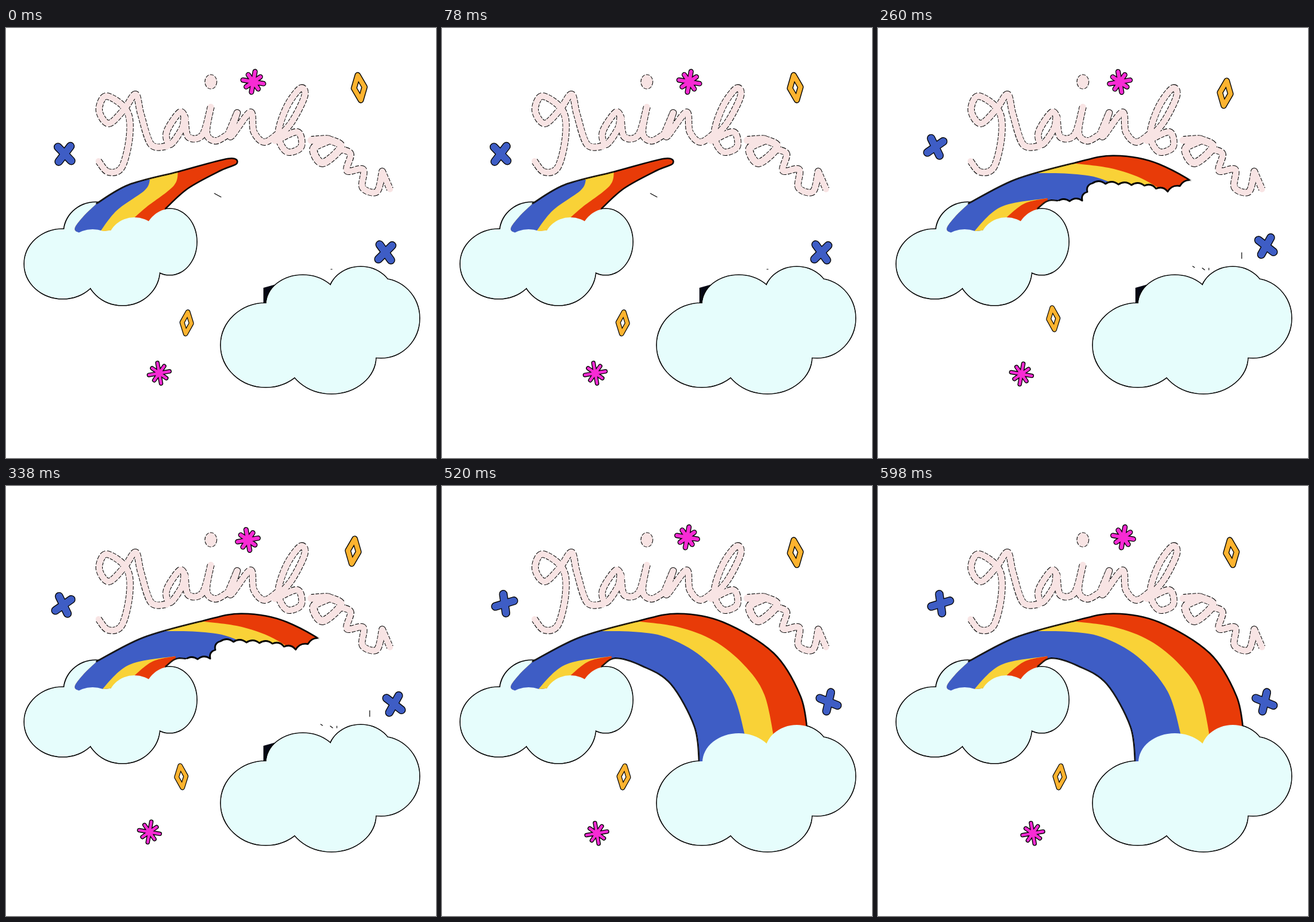
Recreate the animation shown at these times as an HTML page with a canvas. Size 720 by 720 pixels, loop 650 ms.

```html
<!DOCTYPE html>
<html lang="en">
<head>
<meta charset="utf-8">
<title>Rainbow</title>
<style>
html, body { margin: 0; height: 100%; overflow: hidden; background: #fff; }
canvas { display: block; }
</style>
</head>
<body>
<canvas id="stage" width="720" height="720"></canvas>
<script>
const ctx = document.getElementById('stage').getContext('2d');
const STEP = 130, POSES = 5, DEG = Math.PI / 180;
const INK = '#050505', CLOUD = '#e6fdfc', BLUE = '#3e5dc5', YELLOW = '#f9d237',
      RED = '#e83b08', PINK = '#f72bd4', GOLD = '#fdb32f', LETTER = '#f8e4e4';

const points = text => text.trim().split(/[\s/]+/).map(p => p.split(',').map(Number));

// Smooth line through "x,y" points; a slash makes a sharp corner.
function curve(text) {
  const path = new Path2D();
  let last = null;
  for (const part of text.split('/')) {
    const pts = points(part);
    if (last) pts.unshift(last); else path.moveTo(...pts[0]);
    for (let i = 0; i < pts.length - 1; i++) {
      const b = pts[i], c = pts[i + 1], a = pts[i - 1] || b, d = pts[i + 2] || c;
      path.bezierCurveTo(b[0] + (c[0] - a[0]) / 6, b[1] + (c[1] - a[1]) / 6,
        c[0] - (d[0] - b[0]) / 6, c[1] - (d[1] - b[1]) / 6, ...c);
    }
    last = pts[pts.length - 1];
  }
  return path;
}

// Union of ellipses [x, y, rx, ry].
function lobes(...list) {
  const path = new Path2D();
  for (const [x, y, rx, ry] of list) {
    path.moveTo(x + rx, y);
    path.ellipse(x, y, rx, ry, 0, 0, 2 * Math.PI);
  }
  return path;
}

// Everything below and left of a colour boundary.
function below(text) {
  const pts = points(text);
  return curve(`${text}/${pts[pts.length - 1][0]},480/90,480/90,${pts[0][1]}`);
}

// Torn front: scallops of about 20 px between key points.
function tear(text) {
  const pts = points(text), edge = new Path2D();
  edge.moveTo(...pts[0]);
  for (let i = 1; i < pts.length; i++) {
    const [x, y] = pts[i - 1], dx = pts[i][0] - x, dy = pts[i][1] - y;
    const size = Math.hypot(dx, dy), n = Math.max(1, Math.round(size / 20));
    for (let k = 1; k <= n; k++) {
      const mid = (k - .5) / n;
      edge.quadraticCurveTo(x + dx * mid + 8 * dy / size, y + dy * mid - 8 * dx / size,
        x + dx * k / n, y + dy * k / n);
    }
  }
  const area = new Path2D(edge);
  area.lineTo(pts[pts.length - 1][0], 150);
  area.lineTo(90, 150);
  area.lineTo(90, 400);
  area.lineTo(pts[0][0], 400);
  return { edge, area };
}

function line(path, width, colour) {
  ctx.lineWidth = width;
  ctx.strokeStyle = colour;
  ctx.stroke(path);
}

function fill(path, colour) {
  ctx.fillStyle = colour;
  ctx.fill(path);
}

function clipped(paths, draw) {
  ctx.save();
  paths.forEach(p => p && ctx.clip(p));
  draw();
  ctx.restore();
}

const word = [
  '155,223 171,241 194,233 207,180 202,138 168,114 156,138 172,160 198,136 217,111 226,145 243,195 270,198',
  '301,152 291,141 269,174 275,195 295,168 299,148 305,182 329,179 343,132',
  '343,132 336,176 351,189 372,178 / 387,142 / 376,182 409,141 415,174 433,191 458,175',
  '450,189 478,158 500,114 493,101 470,132 456,178 470,207 494,199 488,174 452,189',
  '560,203 577,211 571,239 598,237 597,267 621,274 630,240 / 643,270'
].map(curve);
const letterO = curve('511,188 541,187 515,202 530,226 561,199 541,187');
const dot = lobes([343, 90, 9.5, 11.5]);

const leftBack = lobes([150, 343, 53, 51]);
const leftCloud = lobes([95, 395, 64, 58], [145, 375, 45, 38], [195, 405, 62, 59],
  [215, 360, 45, 43], [274, 358, 45, 55]);
const rightCloud = lobes([435, 531, 75, 70], [545, 550, 74, 62], [628, 486, 64, 66],
  [594, 448, 54, 48], [497, 463, 61, 49], [530, 500, 90, 60]);
const shade = new Path2D('M431 435L467 425L470 470L431 461Z');

const foot = '/245,330/125,345/115,336 130,315 152,294';
const rim = '152,294 230,254 330,226 395,214 470,228 555,280 600,352 612,415';
const inner = '431,465 423,403 383,331 335,301 290,288 267,302';
const arch = {
  body: curve(`${rim}/600,440/431,470/${inner}${foot}`),
  edges: [curve(rim), curve(inner)],
  bands: [
    [YELLOW, below('322,226 395,236 455,259 505,299 540,350 558,435')],
    [BLUE, below('268,243 320,244 375,253 435,286 485,344 508,420')],
    [YELLOW, curve('157,345 205,300 283,285/290,330')],
    [RED, curve('212,320 245,294 284,285/283,330')]
  ]
};
const sproutRim = '152,294 205,263 288,241 372,219 386,227 360,238 305,268 267,302';
const sprout = {
  body: curve(sproutRim + foot),
  edges: [curve(sproutRim)],
  bands: [
    [YELLOW, below('288,238 281,264 235,300 210,322')],
    [BLUE, below('241,254 232,272 185,306 155,345')]
  ]
};
const fronts = [
  null,
  tear('283,288 291,283 297,264 372,247 434,226 424,210'),
  tear('300,291 342,289 359,260 446,264 485,274 526,255'),
  tear('376,334 429,288 480,330 532,334 549,354 598,340'),
  null
];

const cross = new Path2D('M-16 0H16M-2.5 -16L2.5 16');
const gem = new Path2D('M0 -21L9 0L0 21L-9 0Z');
const aster = new Path2D();
for (let i = 0; i < 8; i++) {
  const r = i % 2 ? 14.5 : 17.5, a = i * 45 * DEG;
  aster.moveTo(0, 0);
  aster.lineTo(r * Math.cos(a), r * Math.sin(a));
}

// Marks sway once across and bob twice per loop: [centre, reach, phase in degrees].
const lean = pose => pose === 1 || pose === 2 ? -1 : 1;
const marks = [
  { shape: cross, width: 11.5, colour: BLUE, x: [99, 6.5, 262], y: [206, 10, 61], turn: k => 46 + 9 * k },
  { shape: cross, width: 11.5, colour: BLUE, x: [645, 11.5, 210], y: [370, 9, 51], turn: k => 54 - 8 * k },
  { shape: aster, width: 6, colour: PINK, x: [409, 5, 0], y: [87, 4, -38], turn: k => 10 * lean(k) },
  { shape: aster, width: 4.5, colour: PINK, x: [250, 10, -49], y: [580, 2, 180], turn: k => -10 * lean(k) },
  { shape: gem, width: 7.5, colour: GOLD, x: [587, 5.6, -37], y: [104, 8, 239], turn: k => -7 * lean(k) },
  { shape: gem, width: 7, colour: GOLD, x: [299, 5.7, -51], y: [492, 6.4, 74], turn: k => 6 * lean(k), scale: .87 }
];

// Stray flecks: first pose, last pose, lines.
const flecks = [
  [0, 0, 'M349 277L360 283M544 404h2'],
  [1, 1, 'M491 235l3 1M502 240l10 5M472 262h2'],
  [1, 3, 'M609 376v10M527 399l3 2M543 402l4 3M554 402v3']
].map(([from, to, d]) => [from, to, new Path2D(d)]);

function drawRainbow({ body, edges, bands }, front) {
  const area = front && front.area;
  clipped([area], () => edges.forEach(e => line(e, 3.2, INK)));
  clipped([area, body], () => {
    fill(body, RED);
    bands.forEach(([colour, p]) => fill(p, colour));
    edges.forEach(e => line(e, 2, INK));
  });
  if (front) clipped([body], () => line(front.edge, 2.8, INK));
}

function drawWord() {
  const strokes = (extra, colour) => {
    word.forEach(p => line(p, 10 + extra, colour));
    line(letterO, 12 + extra, colour);
  };
  ctx.setLineDash([6, 2]);
  ctx.lineCap = 'butt';
  strokes(2, INK);
  line(dot, 2, INK);
  ctx.setLineDash([]);
  ctx.lineCap = 'round';
  strokes(0, LETTER);
  fill(dot, LETTER);
}

function drawMark({ shape, width, colour, x, y, turn, scale = 1 }, pose) {
  const swing = ([centre, reach, phase], times) =>
    centre + reach * Math.cos((times * pose * 360 / POSES - phase) * DEG);
  ctx.save();
  ctx.translate(swing(x, 1), swing(y, 2));
  ctx.rotate(turn(pose) * DEG);
  ctx.scale(scale, scale);
  line(shape, width + 2.8, INK);
  line(shape, width, colour);
  ctx.restore();
}

function draw(pose) {
  ctx.fillStyle = '#fff';
  ctx.fillRect(0, 0, 720, 720);
  ctx.lineCap = ctx.lineJoin = 'round';
  drawWord();
  const clouds = [leftBack, leftCloud, rightCloud];
  if (pose < POSES - 1) fill(shade, '#050714');
  clouds.forEach(c => line(c, 3.2, INK));
  clouds.forEach(c => fill(c, CLOUD));
  drawRainbow(pose ? arch : sprout, fronts[pose]);
  fill(leftCloud, CLOUD);
  fill(rightCloud, CLOUD);
  for (const [from, to, path] of flecks) {
    if (pose >= from && pose <= to) line(path, 1.2, INK);
  }
  marks.forEach(m => drawMark(m, pose));
}

function tick() {
  draw(Math.floor(performance.now() / STEP) % POSES);
  requestAnimationFrame(tick);
}
tick();
</script>
</body>
</html>
```
